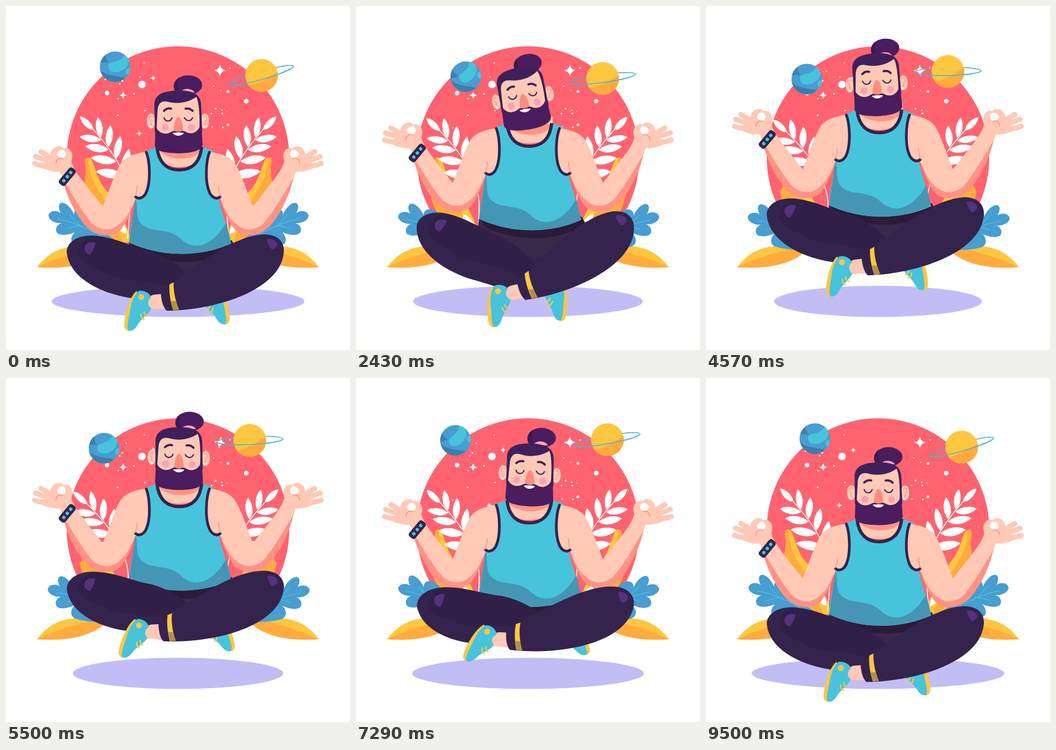
An HTML page for the animation above (9570 ms loop, 640 px wide and 640 px high).

```html
<!DOCTYPE html>
<html lang="en">
<head>
<meta charset="utf-8">
<title>Floating meditation</title>
<style>
html, body { margin: 0; height: 100%; overflow: hidden; background: #fff; }
svg { display: block; width: 100vw; height: 100vh; }
.skin { fill: #ffc9b5; }
.blush { fill: #ff9285; }
.cyan { fill: #48c3dc; }
.blue { fill: #489dd1; }
.gold { fill: #ffc640; }
.amber { fill: #ffab3e; }
.navy { fill: #34234d; }
.hair { fill: #4a1d5e; }
.line { fill: none; stroke-linecap: round; stroke-linejoin: round; }
</style>
</head>
<body>
<svg viewBox="0 0 640 640">
  <defs>
    <clipPath id="globe"><circle r="28.5"/></clipPath>
    <clipPath id="ball"><circle r="30.5"/></clipPath>
    <g id="plant" fill="#fff"></g>

    <g id="goldLeaf">
      <path class="gold" d="M147 289C146 280 156 279 160 288C166 302 172 328 186 342C200 360 218 385 234 440L214 440C170 420 143 385 138 344C150 328 149 308 147 289Z"/>
      <path class="amber" d="M147 289C146 284 150 281 153 283C156 310 162 330 178 352C195 375 206 405 218 440C170 420 143 385 138 344C150 328 149 308 147 289Z"/>
    </g>
    <g id="blueLeaf">
      <path class="blue" d="M212 452C206 432 186 426 168 408C164 396 152 378 138 377C128 377 126 384 127 389C122 376 112 366 104 366C96 368 98 378 102 385C92 378 80 382 79 390C80 399 92 405 104 404C94 406 90 417 96 423C106 429 120 424 128 421C119 430 119 442 130 446C160 456 190 452 212 452Z"/>
      <path class="line" stroke="#48c3dc" stroke-width="1.3" d="M200 442C165 420 130 402 96 396M136 407C130 401 122 394 118 387M142 409C132 408 122 411 114 414"/>
    </g>
    <g id="lowLeaf">
      <path class="amber" d="M58 486C83 453 112 446 144 447L190 452C168 474 130 491 58 486Z"/>
      <path class="gold" d="M58 486C83 453 112 446 144 447L172 449C130 460 105 464 58 486Z"/>
    </g>

    <g id="arm">
      <path class="blush" d="M102 306C108 345 126 383 147 408C165 428 195 434 214 416C230 395 238 368 246 345L225 315L180 385Z"/>
      <path class="skin" d="M96 298L122 290C126 306 142 325 180 373C190 350 200 315 214 292C226 277 246 274 262 271C268 288 270 315 266 336C261 353 252 358 243 354C234 375 224 397 212 405C197 420 174 419 158 402C142 382 122 350 104 318Z"/>
      <path class="line" stroke="#34234d" stroke-width="5" d="M261 272C268 290 269 326 262 344C258 356 248 361 241 355"/>
      <path class="line" stroke="#ff9285" stroke-width="1.5" d="M240 354C243 348 244 341 244 334"/>
      <path class="line" stroke="#ffc9b5" stroke-width="9.5" d="M90 298L62 296L53 293M88 291L66 284L55 280M92 287L75 277L65 271"/>
      <path class="skin" d="M84 281C80 271 88 261 99 261C103 261 105 263 106 265C116 261 126 271 123 284C121 293 118 299 110 305C98 312 82 307 70 303L60 298L82 286Z"/>
      <path fill="#fff" d="M97 271C103 264 111 268 111 276C110 283 104 284 98 281C94 278 94 274 97 271Z"/>
      <path class="line" stroke="#ff9285" stroke-width="1.7" d="M93 293C93 286 99 281 106 284"/>
    </g>

    <g id="foot">
      <path class="gold" d="M243 530C230 540 219 578 220 597C223 608 234 606 240 599L252 550Z"/>
      <path class="cyan" d="M247 530C256 528 268 534 270 542C262 548 263 558 270 562C267 572 254 580 247 590C241 600 236 606 228 604C223 598 229 580 231 566C233 552 238 538 247 530Z"/>
      <circle class="gold" cx="251.5" cy="541.5" r="5.5"/>
      <path class="line" stroke="#ffc640" stroke-width="2.5" d="M257 569C257 573 259 576 263 577M251 573C251 578 253 582 257 583"/>
    </g>
  </defs>

  <circle cx="320" cy="282" r="207" fill="#ff6370"/>
  <g id="stars" fill="#fff"></g>

  <g id="earth">
    <g clip-path="url(#globe)">
      <circle class="blue" r="29"/>
      <g id="land">
        <path class="cyan" d="M-12 -6C-2 -11 10 -9 17 -21L29 -18L22 0C12 11 -2 12 -8 8C-14 3 -13 -1 -12 -6ZM22 4C27 0 31 4 30 13C22 18 17 11 22 4Z"/>
        <path fill="#3f80ab" d="M-30 -8C-24 -14 -21 -22 -17 -24C-17 -16 -14 -10 -11 -6C-17 -9 -24 -8 -30 -8Z"/>
      </g>
      <path fill="#36749f" opacity=".7" d="M-30 3C-20 18 2 16 20 21L0 32L-30 26Z"/>
    </g>
  </g>
  <g id="saturn">
    <ellipse class="ring line" rx="61.5" ry="7.5" stroke="#48b4d0" stroke-width="1.7"/>
    <g clip-path="url(#ball)">
      <circle class="gold" r="31"/>
      <path class="amber" d="M32 -8C12 5 -5 15 -28 20L-5 34L32 30Z"/>
    </g>
    <path class="ring line" stroke="#48b4d0" stroke-width="1.7" d="M-61.5 0A61.5 7.5 0 0 0 61.5 0"/>
  </g>

  <use href="#goldLeaf"/>
  <use href="#goldLeaf" transform="matrix(-1 0 0 1 641 0)"/>
  <g id="plantL"><use href="#plant"/></g>
  <g transform="matrix(-1 0 0 1 641 0)"><g id="plantR"><use href="#plant"/></g></g>
  <use href="#lowLeaf"/>
  <use href="#lowLeaf" transform="matrix(-1 0 0 1 640 0)"/>
  <g id="blueL"><use href="#blueLeaf"/></g>
  <g transform="matrix(-1 0 0 1 642 0)"><g id="blueR"><use href="#blueLeaf"/></g></g>

  <ellipse id="shadow" cx="320" cy="549.5" ry="29" fill="#c3bdf5"/>

  <g id="body">
    <path class="navy" d="M270 480L400 480L336 540L315 540Z"/>
    <path fill="#392849" d="M229 438L421 440L424 470L350 512Q341 517 330 512L225 470Z"/>
    <path fill="#2b1b39" d="M229 436L420 436L426 447C390 482 300 486 240 455Z"/>
    <path class="skin" d="M280 250L366 250L366 275C358 308 286 308 280 275Z"/>
    <path class="blush" d="M282 266L364 264C356 290 300 290 282 266Z"/>
    <path class="cyan" d="M258 271L281 262C284 292 300 305 322 305C345 305 361 292 364 262L387 270C376 310 382 330 394 350C399 378 412 410 419 442C360 468 290 468 229 440C231 412 238 380 243 350C262 340 272 300 258 271Z"/>
    <path fill="#4596b5" d="M241 358C246 372 241 390 249 402C268 426 302 408 328 436C355 458 388 442 410 402L419 442C360 468 290 468 229 440Z"/>
    <path fill="none" stroke="#34234d" stroke-width="6" d="M281 263C284 292 300 305 322 305C345 305 361 292 364 262"/>
    <use href="#arm"/>
    <use href="#arm" transform="matrix(-1 0 0 1 639.5 0)"/>
    <g transform="translate(114 317.5) rotate(-50)">
      <rect class="navy" x="-19" y="-7.5" width="38" height="15" rx="5"/>
      <g class="cyan"><circle cx="-10" r="3.2"/><circle r="3.2"/><circle cx="10" r="3.2"/></g>
    </g>

    <g id="legL">
      <g transform="matrix(-1 0 0 1 636 -12)"><g class="shoe"><use href="#foot"/></g></g>
      <path class="navy" d="M113 457C114 437 136 426 162 427C205 430 235 449 270 457C300 467 335 490 350 515L338 560C300 556 255 546 230 543C165 532 116 500 113 457Z"/>
      <path fill="#2f1f45" opacity=".7" d="M136 462C134 448 142 436 160 428C205 430 235 449 270 457C300 467 330 486 345 508L330 540C290 500 215 520 180 494C160 484 140 480 136 462Z"/>
      <path fill="#55327d" d="M146 453C145 443 154 437 167 440C165 449 161 456 156 463C151 461 147 458 146 453Z"/>
    </g>
    <g id="legR">
      <path class="skin" d="M298 535L276 537C262 538 259 560 270 564L300 563Z"/>
      <g class="shoe"><use href="#foot"/></g>
      <path class="navy" d="M517 455C517 435 501 424 478 425C428 428 375 468 309 515L288 534C289 548 292 560 299 567C395 566 515 526 517 455Z"/>
      <path class="gold" d="M304 518L312 514C311 532 316 550 322 565L311 566C306 550 303 534 304 518Z"/>
      <path fill="#b58f47" d="M307 549L316 549L322 565L311 566Z"/>
      <path fill="#55327d" d="M485 434C493 431 503 435 505 444C503 449 499 452 495 453C490 449 487 442 485 434Z"/>
    </g>

    <g id="head">
      <g id="bun">
        <ellipse class="hair" cx="339" cy="147" rx="26" ry="18"/>
        <path fill="#3b194f" d="M322 134C312 138 309 152 316 160L326 163C319 152 318 142 322 134Z"/>
        <path fill="#ff9fc0" d="M323 162C328 152 346 152 351 161Z"/>
      </g>
      <g class="skin"><ellipse cx="270" cy="214" rx="8" ry="14"/><ellipse cx="370" cy="214" rx="8" ry="14"/></g>
      <path class="line" stroke="#ff9285" stroke-width="1.4" d="M274 207C268 202 264 210 268 213C272 215 267 220 272 222M366 207C372 202 376 210 372 213C368 215 373 220 368 222"/>
      <g fill="#fff"><circle cx="270" cy="225" r="2.2"/><circle cx="368" cy="225" r="2.2"/></g>
      <path fill="#40205a" d="M276 182C277 165 292 158 320 157C348 157 362 164 363 184L365 235H277Z"/>
      <path class="skin" d="M282 192C284 180 290 176 300 178C322 184 342 178 354 169C359 177 361 205 360 230L340 245H295L280 232Z"/>
      <path class="hair" d="M278 222C283 238 297 240 306 235C313 230 329 230 336 235C347 240 359 234 363 218L366 258C364 270 342 274 322 274C300 274 279 271 277 260Z"/>
      <path fill="#fff" d="M310 236C317 235 325 235 331 236C327 243 314 243 310 236Z"/>
      <path fill="#ff8c7d" d="M320 207C327 207 330 224 329 231C326 235 315 235 312 231C312 224 315 207 320 207Z"/>
      <g fill="#ff9fb5"><circle cx="296" cy="226" r="6.5"/><circle cx="345" cy="226" r="6.5"/></g>
      <path class="line" stroke="#40205a" stroke-width="2.2" d="M294 208C297 216 306 216 309 208M332 208C336 215 344 215 347 208"/>
      <path class="line" stroke="#40205a" stroke-width="4" d="M294 195C298 191 303 190 307 191M334 191C339 190 344 192 347 195"/>
    </g>
  </g>
</svg>
<script>
const LOOP = 9570, FPS = 14, STEPS = 134;
const $ = id => document.getElementById(id);

function add(parent, tag, attrs) {
  const el = document.createElementNS('http://www.w3.org/2000/svg', tag);
  for (const k in attrs) el.setAttribute(k, attrs[k]);
  return $(parent).appendChild(el);
}

let seed = 7;
const random = () => (seed = seed * 16807 % 2147483647) / 2147483647;

// A pointed leaf growing from x, y; the angle is measured clockwise from straight up.
function leaf(x, y, angle, size) {
  add('plant', 'path', {
    d: 'M0 0C-.26 -.25 -.2 -.7 0 -1C.18 -.8 .23 -.35 0 0Z',
    transform: `translate(${x} ${y}) rotate(${angle}) scale(${size})`
  });
}

for (let i = 0; i < 5; i++) {
  const x = 163 + 14 * i, y = 230 + 12 * i + 2 * i * i;
  leaf(x, y, 14 - 60 * 0.4 ** i, 35 + 2.5 * i);
  if (i) leaf(x, y + 5, -82, 36 + 4 * i);
}
leaf(224, 424, -32, 45);
add('plant', 'path', { class: 'line', stroke: '#fff', 'stroke-width': 1.6,
  d: 'M158 225C190 260 230 310 231 365C231 390 228 410 226 432' });

const bigDots = [[253, 146, 7], [447, 177, 4.3], [413, 221, 2.6], [413, 159, 2.6], [188, 162, 4.2]]
  .map(([cx, cy, r]) => add('stars', 'circle', { cx, cy, r }));

// Fine dust to the left and right of the head.
for (let i = 0; i < 22; i++) {
  const cx = i % 2 ? 370 + 58 * random() : 180 + 85 * random();
  add('stars', 'circle', { cx, cy: 98 + 140 * random(), r: 0.8 + random() });
}

const sparks = [[398, 120, 11], [218, 166, 7.5], [274, 134, 5.5], [248, 237, 5.5]].map(([x, y, r]) => {
  const el = add('stars', 'path', { d: 'M0 -1Q.13 -.13 1 0Q.13 .13 0 1Q-.13 .13 -1 0Q-.13 -.13 0 -1Z' });
  return turn => el.setAttribute('transform', `translate(${x} ${y}) rotate(${turn}) scale(${r})`);
});

const move = (id, value) => $(id).setAttribute('transform', value);
const rings = document.querySelectorAll('.ring');
const shoes = document.querySelectorAll('.shoe');

function draw(t) {
  const phase = 2 * Math.PI * t / LOOP, s = Math.sin(phase), c = Math.cos(phase);
  const wave = (mid, a, b) => mid + a * c + b * s;

  // Up and down again; the body leaves the ground faster than it lands.
  const p = 1 - Math.abs(1 - 2 * t / LOOP);
  const lift = p * p * (3 - 2 * p);
  const haste = t < LOOP / 2 ? 0.6 : 0.2;
  const rise = -69.5 * (lift + haste * (Math.sin(p * Math.PI / 2) - lift));

  const nod = -6 * s - 2.2 * s * s - 0.7 * (1 - c) + s * c;
  const leg = -7.5 * s;

  $('shadow').setAttribute('rx', 235 - 42 * lift);
  move('body', `translate(0 ${rise})`);
  move('head', `rotate(${nod} 320 275)`);
  move('bun', `translate(0 ${-0.65 * nod})`);
  move('legR', `rotate(${leg} 490 455)`);
  move('legL', `rotate(${-leg} 145 455)`);
  for (const el of shoes) el.setAttribute('transform', `rotate(${leg} 272 550)`);

  move('plantL', `rotate(${-3.6 * lift} 228 430)`);
  move('plantR', `rotate(${-lift} 228 430)`);
  move('blueL', `rotate(${-1.7 * lift} 200 440)`);
  move('blueR', `rotate(${-2.5 * lift} 200 440)`);

  move('earth', `translate(${wave(194.5, 8.5, 10)} ${wave(124, -11, 7.2)})`);
  move('land', `rotate(${-25 * s * s})`);
  move('saturn', `translate(${wave(463, 12.5, -3.8)} ${wave(124.7, 4.3, 10.2)})`);
  for (const el of rings) el.setAttribute('transform', `rotate(${wave(-8.7, -7.3, 1)})`);

  bigDots.forEach((el, i) => {
    const blink = 1143 + 1650 * i;
    el.setAttribute('opacity', Math.min(1, Math.abs(t - blink) / 450));
  });
  sparks.forEach((place, i) => place(i ? 0 : 14 * Math.sin(2 * phase)));
}

let start;
function tick(now) {
  start ??= now;
  const step = Math.min(STEPS - 1, Math.floor(((now - start) % LOOP + 6) * FPS / 1000));
  draw(step * 1000 / FPS);
  requestAnimationFrame(tick);
}
draw(0);
requestAnimationFrame(tick);
</script>
</body>
</html>
```
